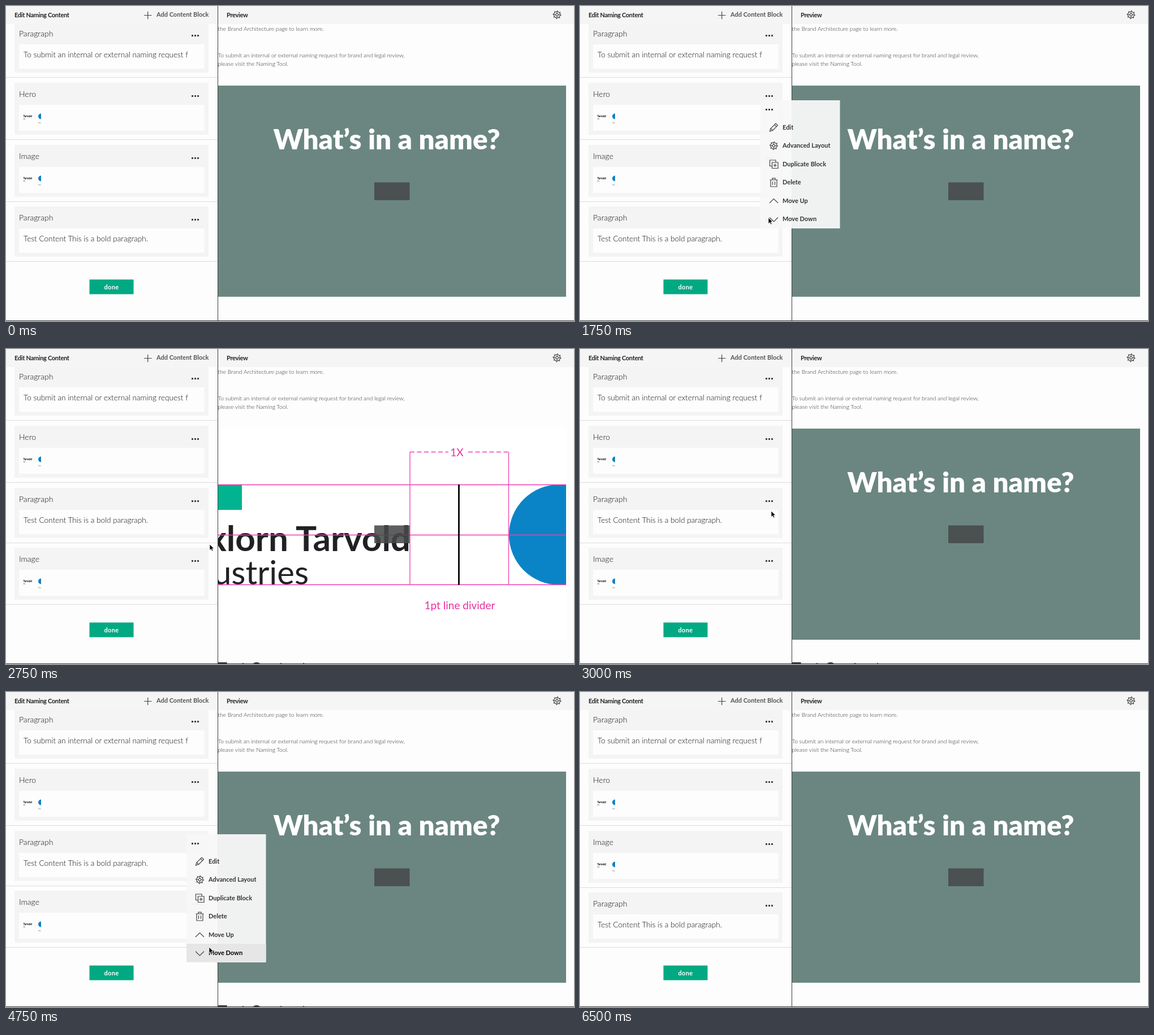
Recreate the animation shown at these times as an HTML page. Size 1004 by 558 pixels, loop 7 s.

```html
<!DOCTYPE html>
<html lang="en">
<head>
<meta charset="utf-8">
<title>Content block editor</title>
<style>
  html, body { margin: 0; width: 100%; height: 100%; overflow: hidden; background: #fdfdfd; }
  svg { display: block; width: 1004px; height: 558px; font-family: Lato, "Open Sans", sans-serif; }
  .light { font-weight: 300; font-size: 14px; fill: #111; }
  .content { font-size: 13.6px; }
  .copy { font-weight: 300; font-size: 10.2px; fill: #333; }
  .bold { font-weight: 700; font-size: 11px; fill: #333; }
  .title { letter-spacing: -.3px; fill: #222; }
  .icon { fill: none; stroke: #444; stroke-width: 1.2; }
  .pink { fill: none; stroke: #ec3fae; stroke-width: 1.3; }
  .note { font-size: 19px; fill: #e9309f; text-anchor: middle; }
</style>
</head>
<body>
<svg viewBox="0 0 1004 558">
  <defs>
    <g id="dots" fill="#444"><path d="M0 0h3v3h-3zM5 0h3v3h-3zM10 0h3v3h-3z"/></g>
    <g id="gear" class="icon" stroke-width="1">
      <circle r="5.600"/><circle r="2.200"/>
      <circle r="6.900" stroke-width="1.500" stroke-dasharray="1.500 3.920"/>
      <path d="M0-5.600V-2.200M0 5.600V2.200M-5.600 0H-2.200M5.600 0H2.200" stroke-width=".9"/>
    </g>
    <g id="pencil" class="icon"><path d="M-7 7l1.500-5L3.500-7 7-3.500-2 5.500zM-5.500 2L-2 5.500M1.300-4.800l3.500 3.500"/></g>
    <g id="copy" class="icon"><path d="M-3-3H7.500V7.500H-3zM-3 3.500H-7V-7H3.500V-3M2.200-.5v5.500M-.5 2.200h5.500"/></g>
    <g id="trash" class="icon"><path d="M-7-4.500H7M-5.500-4.500V7.500H5.500V-4.500M-2.500-4.500V-7.300H2.500V-4.500M-2-1.500v6M2-1.500v6"/></g>
    <g id="up" class="icon"><path d="M-7.500 4L0-3.500 7.500 4"/></g>
    <g id="down" class="icon"><path d="M-7.500-3L0 4.500 7.500-3"/></g>
    <clipPath id="thumbClip"><path d="M30 45h32v40h-32z"/></clipPath>
    <clipPath id="imageClip"><path d="M374 141h616v374h-616z"/></clipPath>
    <g id="thumb" clip-path="url(#thumbClip)">
      <text x="30.500" y="61" font-size="4.600" font-weight="900" fill="#222">Tarvold</text>
      <text x="30.500" y="64.700" font-size="4" fill="#333">es</text>
      <circle cx="62" cy="59.500" r="5" fill="#1181c4"/>
      <text x="57" y="71.500" font-size="4" fill="#6f8299">line</text>
    </g>
  </defs>

  <rect width="1004" height="558" fill="#fdfdfd"/>

  <g id="preview">
    <text class="copy" x="374.500" y="44">the Brand Architecture page to learn more.</text>
    <text class="copy" x="374.500" y="90.500">To submit an internal or external naming request for brand and legal review,</text>
    <text class="copy" x="374.500" y="106">please visit the Naming Tool.</text>
    <g id="hero">
      <rect x="374" y="141" width="616" height="374" fill="#6b8680"/>
      <text x="673" y="254" text-anchor="middle" font-size="49.300" font-weight="900" fill="#fff">What’s in a name?</text>
    </g>
    <g id="diagram" clip-path="url(#imageClip)">
      <rect x="374" y="141" width="616" height="374" fill="#fff"/>
      <rect x="372" y="240" width="45" height="45" fill="#01b48f"/>
      <g text-anchor="end" fill="#202124">
        <text x="715" y="358" font-size="62" font-weight="700">xlorn Tarvold</text>
        <text x="535" y="417" font-size="58">ustries</text>
      </g>
      <circle cx="978" cy="329" r="89" fill="#0a84c6"/>
      <path class="pink" d="M374 240.500H990M374 329.500H990M374 417.500H990M714 182.500V418M888.500 182.500V418"/>
      <path class="pink" d="M714 182.500H782M817 182.500H888" stroke-dasharray="8 4.500"/>
      <path d="M800.500 240V418" stroke="#111" stroke-width="3"/>
      <text class="note" x="797" y="189.500">1X</text>
      <text class="note" x="802" y="460.500">1pt line divider</text>
    </g>
    <rect x="651" y="312.500" width="62.500" height="31.500" fill="#474949" fill-opacity=".87"/>
    <text id="below" x="374.500" y="576" font-size="28" fill="#333">Test Content</text>
  </g>

  <rect width="374" height="558" fill="#fdfdfd"/>
  <g id="cards"></g>
  <rect id="glow" x="145.500" y="482.500" width="82" height="30" fill="#01a982"/>
  <rect x="147.500" y="484.500" width="78" height="26" fill="#01a982"/>
  <text class="bold" x="186.500" y="501.500" text-anchor="middle" style="fill:#fff;letter-spacing:.3px">done</text>

  <rect width="1004" height="32" fill="#f5f5f5"/>
  <text class="bold title" x="15" y="20">Edit Naming Content</text>
  <path class="icon" d="M244 16.500h13.500M250.700 9.800v13.500"/>
  <text class="bold" x="266" y="19" style="fill:#555">Add Content Block</text>
  <text class="bold title" x="390" y="20">Preview</text>
  <use href="#gear" x="974" y="15.500"/>
  <path d="M374.500 0V558M0 557.500H1004" stroke="#3c3c3c"/>

  <g id="menu">
    <rect x="319" width="140.500" height="227" fill="#f8f8f8" fill-opacity=".95"/>
    <rect id="hover" x="319" width="140.500" height="32.500" fill="#e6e6e6"/>
    <use href="#dots" x="328" y="15"/>
    <g id="items"></g>
  </g>
  <path id="cursor" d="M0 0V10.500L2.500 8.300 4.200 12 6 11.200 4.400 7.600H7.600Z" fill="#000" stroke="#fff" stroke-width=".7"/>
</svg>

<script>
const LOOP = 7000;
const ROW = 32.5;
const $ = id => document.getElementById(id);

const card = (id, label, text) => {
  const height = text ? 89 : 92;
  return `<g id="${id}">
    <rect x="15" width="343" height="${height}" fill="#f4f4f4"/>
    <rect x="23" y="39" width="327.500" height="${height - 46}" fill="#fdfdfd"/>
    <text class="light" x="23" y="25">${label}</text>
    <use href="#dots" x="328" y="22"/>
    ${text ? `<text class="light content" x="31" y="62">${text}</text>` : '<use href="#thumb"/>'}
    <path d="M0 ${height + 8.5}H374" stroke="#dcdcdc"/>
  </g>`;
};

$('cards').innerHTML =
  card('intro', 'Paragraph', 'To submit an internal or external naming request f') +
  card('heroCard', 'Hero') +
  card('imageCard', 'Image') +
  card('testCard', 'Paragraph', 'Test Content This is a bold paragraph.');

const items = [
  ['pencil', 'Edit'], ['gear', 'Advanced Layout'], ['copy', 'Duplicate Block'],
  ['trash', 'Delete'], ['up', 'Move Up'], ['down', 'Move Down']
];
$('items').innerHTML = items.map(([icon, label], i) => {
  const y = 48 + i * ROW;
  return `<use href="#${icon}" x="342.500" y="${y}"/>
    <text class="bold" x="358" y="${y + 3.5}">${label}</text>`;
}).join('');
const labels = $('items').querySelectorAll('text');

// Each entry: start time, then the values held until the next entry.
const cursorSteps = [
  [0], [250, 372, 224], [500, 350, 247], [750, 288, 336], [1000, 289, 335],
  [1250, 326, 366], [1500, 333, 375], [2000, 357, 340], [2250, 360, 346],
  [3000, 338, 287], [3250, 329, 268], [4250, 359, 457], [4500, 359, 452],
  [5500, 200, 494], [6000]
];
// Menu top and hovered row.
const menuSteps = [
  [0], [1750, 167, -1], [2000, 167, 4], [2750],
  [3750, 252, -1], [4250, 252, 5], [5000]
];

const held = (steps, t) => steps.filter(s => s[0] <= t).pop().slice(1);
const show = (id, on) => { $(id).style.display = on ? '' : 'none'; };
const place = (id, x, y) => $(id).setAttribute('transform', `translate(${x} ${y})`);

place('intro', 0, 29);
place('heroCard', 0, 136);

function render(t) {
  const swapped = t >= 2750 && t < 5000;
  const diagram = t >= 2750 && t < 3000;
  place('imageCard', 0, swapped ? 352 : 246);
  place('testCard', 0, swapped ? 246 : 355);
  show('hero', !diagram);
  show('diagram', diagram);
  show('below', swapped);
  show('glow', t >= 5750 && t < 6000);

  const [top, row] = held(menuSteps, t);
  show('menu', top !== undefined);
  if (top !== undefined) {
    place('menu', 0, top);
    show('hover', row >= 0);
    $('hover').setAttribute('y', 31.5 + row * ROW);
    labels.forEach((label, i) => { label.style.fill = i === row ? '#000' : ''; });
  }

  const [x, y] = held(cursorSteps, t);
  show('cursor', x !== undefined);
  if (x !== undefined) place('cursor', x, y);
}

const start = performance.now();
function tick() {
  render((performance.now() - start) % LOOP);
  requestAnimationFrame(tick);
}
tick();
</script>
</body>
</html>
```
